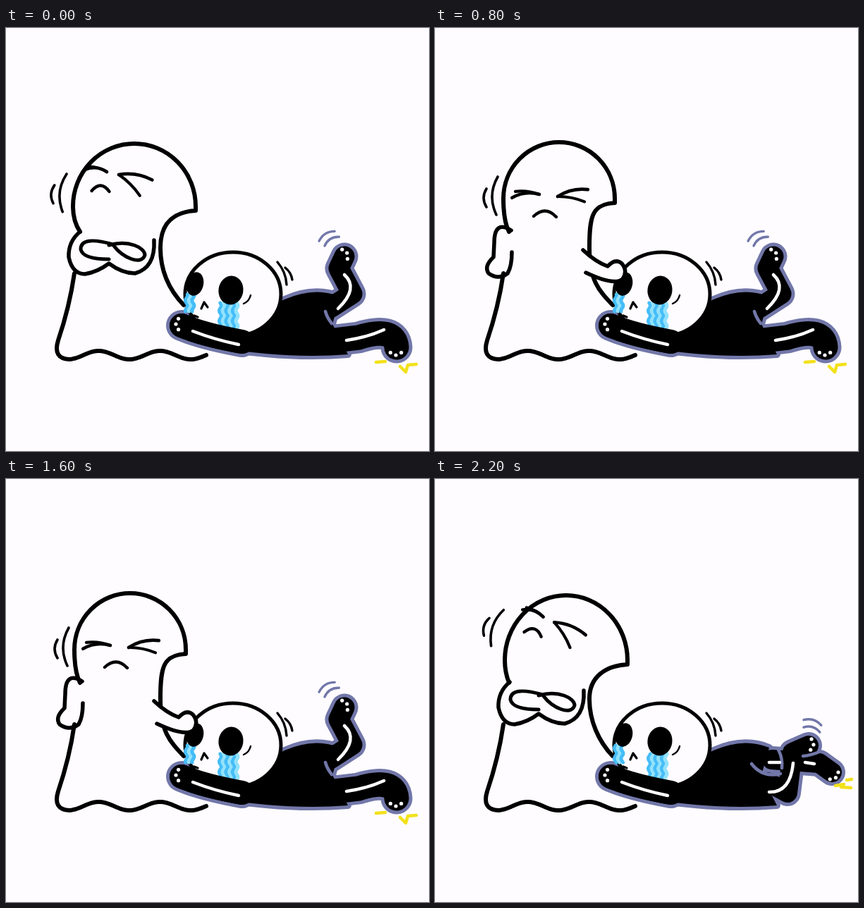
An HTML page for the animation above (2400 ms loop, 600 by 600 pixels).

```html
<!DOCTYPE html>
<html lang="en">
<head>
<meta charset="utf-8">
<title>Ghost and skeleton</title>
<style>
  html, body { margin: 0; width: 100%; height: 100%; overflow: hidden; background: #fefcff; }
  svg { display: block; width: 100%; height: 100%; }
  path { stroke-linecap: round; stroke-linejoin: round; }
</style>
</head>
<body>
<svg id="stage" viewBox="0 0 600 600"></svg>
<script>
const INK = '#000', PAPER = '#fefcff', LILAC = '#7277a9', YELLOW = '#f3e11b', BONE = '#fff';
const STEP = 200, STEPS = 12;

const stroke = (d, width = 4, color = INK, fill = 'none') =>
  `<path d="${d}" fill="${fill}" stroke="${color}" stroke-width="${width}"/>`;
const oval = (x, y, rx, ry, color, turn = 0, edge = 0) =>
  `<ellipse cx="${x}" cy="${y}" rx="${rx}" ry="${ry}" fill="${color}" stroke="${INK}" stroke-width="${edge}" transform="rotate(${turn} ${x} ${y})"/>`;
const moved = (content, transform) => `<g transform="${transform}">${content}</g>`;
const polar = (x, y, r, deg) => [x + r * Math.cos(deg * Math.PI / 180), y + r * Math.sin(deg * Math.PI / 180)];
const range = n => [...Array(n).keys()];

// Arc between two points whose middle lies "bend" to the left of the direction of travel.
function bow(x1, y1, x2, y2, bend = 0, width = 4, color = INK) {
  const len = Math.hypot(x2 - x1, y2 - y1), k = 2 * bend / len;
  const cx = (x1 + x2) / 2 + (y2 - y1) * k, cy = (y1 + y2) / 2 - (x2 - x1) * k;
  return stroke(`M${x1} ${y1}Q${cx} ${cy} ${x2} ${y2}`, width, color);
}

// Ghost
const hem = range(50).map(i => 90 + i * 194 / 49)
  .map(x => `L${x} ${464 + 6 * Math.cos((x - 88) / 87 * 2 * Math.PI)}`).join('');
const gown = stroke('M97 348Q90 396 74 443Q66 469 90 470' + hem, 6);

const crossedArms = stroke('M105 289Q88 303 89 325Q94 349 112 349Q130 346 146 334Q165 348 183 348Q212 340 210 301', 5.5) +
  stroke('M152 307Q106 294 106 314Q109 328 146 328M146 308C175 300 197 312 197 322C192 338 165 325 153 309', 5);
const leftArm = stroke('M108 287Q84 272 84 305L83 325Q69 338 76 348Q90 358 103 348Q109 338 109 318', 5.5);
const rightArm = stroke('M210 315Q228 332 245 338Q256 326 265 334Q274 345 266 356Q254 366 214 347', 5.5, INK, PAPER);

function outline(cx, cy, rx, ry) {
  const left = cx - rx, right = cx + rx, tip = cy + 6;
  return stroke(`M105 289Q${left} 274 ${left} ${cy}A${rx} ${ry} 0 0 1 ${right} ${cy}L${right} ${tip}` +
    `C${right - 32} ${tip + 2} 219 ${tip + 18} 219 312S232 372 252 393`, 6);
}

function eye(x, y, len, angle, gap) {
  const [ax, ay] = polar(x, y, len, angle - gap), [bx, by] = polar(x, y, len * 0.88, angle + gap);
  const side = Math.cos(angle * Math.PI / 180) < 0 ? -1 : 1;
  return bow(x, y, ax, ay, 4 * side, 4.6) + bow(x, y, bx, by, 2 * side, 4.2);
}

const mouth = (x, y, width) => bow(x - width / 2, y + 4, x + width / 2, y + 5, 8, 4.4);
const marks = (x, y) => bow(x, y, x - 2, y + 54, -7, 3.6) + bow(x - 16, y + 17, x - 16, y + 43, -4, 3.6);

const crossedFace = eye(143, 204, 31, 191, 5) + eye(160, 208, 48, 27, 18) +
  mouth(134, 227, 25) + moved(marks(86, 207), 'rotate(4 86 207)');

const poses = {
  crossed: () => outline(182, 253, 87, 89) + crossedArms + crossedFace,
  leaning: () => outline(186, 257, 87, 92) + moved(crossedArms, 'translate(1 -1)') +
    moved(crossedFace, 'translate(0 -8) rotate(13 150 250)'),
  push: () => outline(176, 242, 79, 80) + leftArm +
    eye(148, 236, 39, 180, 7) + eye(174, 239, 44, -1, 12) + mouth(156, 263, 32) + marks(89, 211),
  turned: () => outline(178, 245, 86, 78) + moved(leftArm, 'translate(-2 2)') +
    eye(105, 234, 43, -2, 7) + mouth(103, 260, 21) + marks(85, 214)
};

// Skeleton
const toes = (x, y, dir) => [-50, 0, 50].map(a => oval(...polar(x, y, 10, dir + a), 2.6, 2.6, BONE)).join('');
const bone = d => stroke(d, 4.5, BONE);
const torso = 'M300 430L395 385Q438 366 474 381L463 420L485 463Q400 470 300 453Z';
const arm = { d: 'M249 422Q280 435 335 445', width: 34 };

const legPoses = [
  {
    limbs: [{ d: 'M450 445L500 439Q552 423 554 453', width: 35 }, { d: 'M460 397L491 377L472 341L480 324', width: 29 }],
    details: () => bow(453, 402, 462, 419, -1, 4.5, LILAC) +
      bone('M483 443Q512 439 536 428') + bone('M480 350Q501 369 471 398') +
      toes(553, 454, 90) + toes(475, 324, -30),
    swish: [457, 300, -32],
    sparks: 'M525 474L538 473M559 480L567 488L570 478L582 477'
  },
  {
    limbs: [{ d: 'M478 398L545 403L563 416', width: 28 }, { d: 'M472 430L500 445L507 388L530 378', width: 28 }],
    details: () => bow(449, 404, 490, 418, -7, 4.5, LILAC) + bow(487, 384, 492, 410, 2, 4.5, LILAC) +
      bow(522, 393, 545, 387, -1, 4.5, LILAC) +
      bone('M508 403Q504 445 474 444') + bone('M474 402H489M525 402L538 404') +
      toes(527, 376, 5) + toes(562, 416, 50),
    swish: [533, 350, 17],
    sparks: 'M568 435L580 433L576 437L590 438M584 427L591 426'
  }
];

const swish = ([x, y, turn], color) =>
  moved(bow(-12, -5, 14, -5, 4, 3.4, color) + bow(-9, 5, 15, 5, 4, 3.4, color), `translate(${x} ${y}) rotate(${turn})`);

// A stream of wavy stripes, alternately blue and pale.
function tears(x, top, bottom, count, phase) {
  return range(count).map(i => {
    const path = range(15).map(k => {
      const y = top + (bottom - top) * k / 14;
      return `${k ? 'L' : 'M'}${x + i * 4.7 + 1.6 * Math.sin(y / 2.3 + phase)} ${y}`;
    }).join('');
    return stroke(path, 5, i % 2 ? '#93e2fb' : '#45bdf8');
  }).join('');
}

function skull(phase) {
  return oval(322, 377.5, 68, 59.5, PAPER, 0, 5) +
    tears(256, 378, 402, 3, phase) + tears(304, 390, 426, 6, phase) +
    oval(268, 363, 12, 17, INK, 14) + oval(319, 372, 17.5, 20.5, INK, 8) +
    stroke('M277 398L281 389L286 396M267 408L272 410', 3.2) + bow(337, 391, 347, 379, -2, 2.4) +
    bow(385, 332, 398, 364, 3, 3.4) + bow(396, 340, 406, 357, 2, 3.4);
}

function skeleton(alt) {
  const { limbs, details, swish: place, sparks } = legPoses[alt];
  const parts = [...limbs, arm];
  return stroke(torso, 10, LILAC) + parts.map(p => stroke(p.d, p.width + 10, LILAC)).join('') +
    stroke(torso, 0, INK, INK) + parts.map(p => stroke(p.d, p.width)).join('') +
    details() + swish(place, LILAC) + stroke(sparks, 4.5, YELLOW) + skull(alt * 2) +
    stroke(arm.d, arm.width) + bone('M265 430Q296 442 330 449') + toes(251, 420, 180);
}

function scene(step) {
  const odd = step % 2, pushing = step >= 4 && step < 11;
  const pose = pushing ? (odd ? 'turned' : 'push') : (step === 11 ? 'leaning' : 'crossed');
  return poses[pose]() + gown + skeleton(odd) + (pushing ? rightArm : '');
}

const stage = document.getElementById('stage');
const start = performance.now();
let shown = -1;

function draw() {
  const step = Math.floor(Math.max(0, performance.now() - start) / STEP) % STEPS;
  if (step !== shown) stage.innerHTML = scene(shown = step);
  requestAnimationFrame(draw);
}
draw();
</script>
</body>
</html>
```
